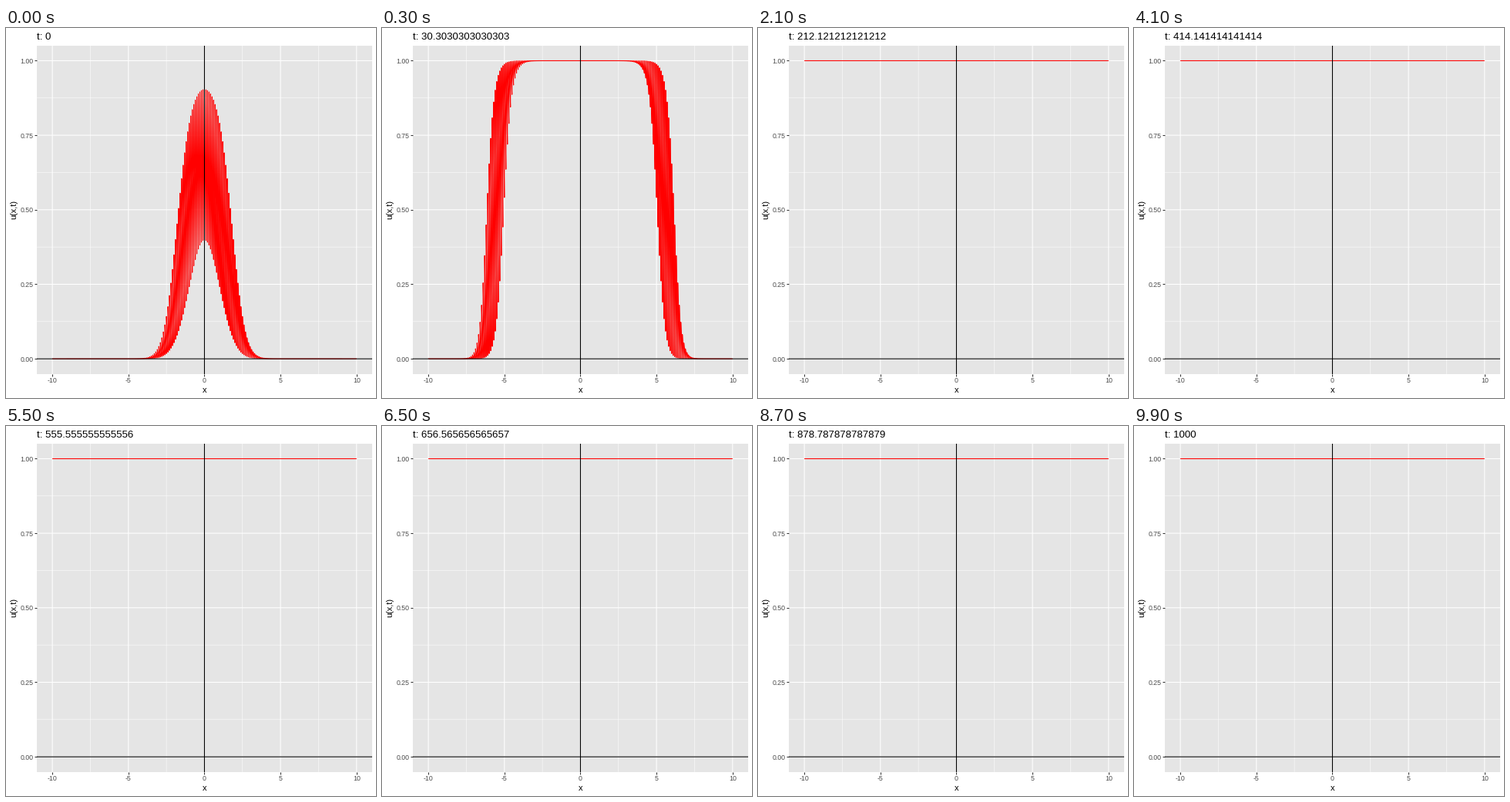
Animation of 480 by 480 pixels, one loop 10 s. Source, as a matplotlib script:

```python
import numpy as np
import matplotlib.pyplot as plt
from matplotlib.animation import FuncAnimation

SIZE, DPI = 480, 72
FRAMES, INTERVAL = 100, 100
T_END = 1000
LEFT, RIGHT, TOP, BOTTOM = 40.4, 474.5, 23.1, 448.5
LINE = 1.07

plt.rcParams["font.family"] = "Liberation Sans"
plt.rcParams["path.simplify"] = False


def solve(growth=0.5, mix=0.24):
    """Logistic growth with diffusion, one explicit step per unit of time."""
    x = np.arange(-160, 161) / 10
    u = np.exp(-x**2 / 2) / np.sqrt(2 * np.pi)
    rows = [u]
    for _ in range(T_END):
        spread = np.roll(u, 2) + np.roll(u, -2) - 2 * u
        u = u + growth * u * (1 - u) + mix * spread
        rows.append(u)
    shown = np.abs(x) <= 10
    return x[shown], np.array(rows)[:, shown]


x, u = solve()
steps = np.arange(T_END + 1)
bins = np.rint(steps * (FRAMES - 1) / T_END).astype(int)

fig = plt.figure(figsize=(SIZE / DPI, SIZE / DPI), dpi=DPI, facecolor="white")
ax = fig.add_axes([LEFT / SIZE, 1 - BOTTOM / SIZE,
                   (RIGHT - LEFT) / SIZE, (BOTTOM - TOP) / SIZE])
ax.set_facecolor("#E5E5E5")
ax.set(xlim=(-11, 11), ylim=(-0.05, 1.05))
for side in ax.spines.values():
    side.set_visible(False)

major_x, major_y = np.arange(-10, 11, 5), np.arange(5) / 4
ax.set_xticks(major_x, [str(v) for v in major_x])
ax.set_yticks(major_y, [f"{v:.2f}" for v in major_y])
ax.tick_params(length=2.74, width=LINE, pad=2.2, color="#333333",
               labelcolor="#4D4D4D", labelsize=8.8)


def grid(xs, ys, width, z):
    style = dict(color="white", lw=width, zorder=z, snap=False)
    for v in xs:
        ax.axvline(v, **style)
    for v in ys:
        ax.axhline(v, **style)


grid(major_x[:-1] + 2.5, major_y[:-1] + 0.125, LINE / 2, 0.5)
grid(major_x, major_y, LINE, 0.6)

curve, = ax.plot([], [], color="red", lw=LINE, zorder=2, snap=False,
                 solid_capstyle="butt", solid_joinstyle="round")
ax.axhline(0, color="black", lw=LINE, zorder=3, snap=False)
ax.axvline(0, color="black", lw=LINE, zorder=3, snap=False)


def label(px, py, text, size, **kw):
    return fig.text(px / SIZE, 1 - py / SIZE, text, fontsize=size,
                    color="black", va="baseline", **kw)


title = label(LEFT, 15, "", 13.2)
label((LEFT + RIGHT) / 2, 472.6, "x", 11, ha="center")
label(13.4, (TOP + BOTTOM) / 2, "u(x,t)", 11, ha="center",
      rotation=90, rotation_mode="anchor")


def update(i):
    # All steps that round to this frame share one line, ordered by x.
    rows = u[bins == i]
    curve.set_data(np.repeat(x, len(rows)), rows.T.ravel())
    title.set_text(f"t: {T_END * i / (FRAMES - 1):.15g}")
    return curve, title


anim = FuncAnimation(fig, update, frames=FRAMES, interval=INTERVAL,
                     repeat=True, repeat_delay=0, blit=False)
plt.show()
```
